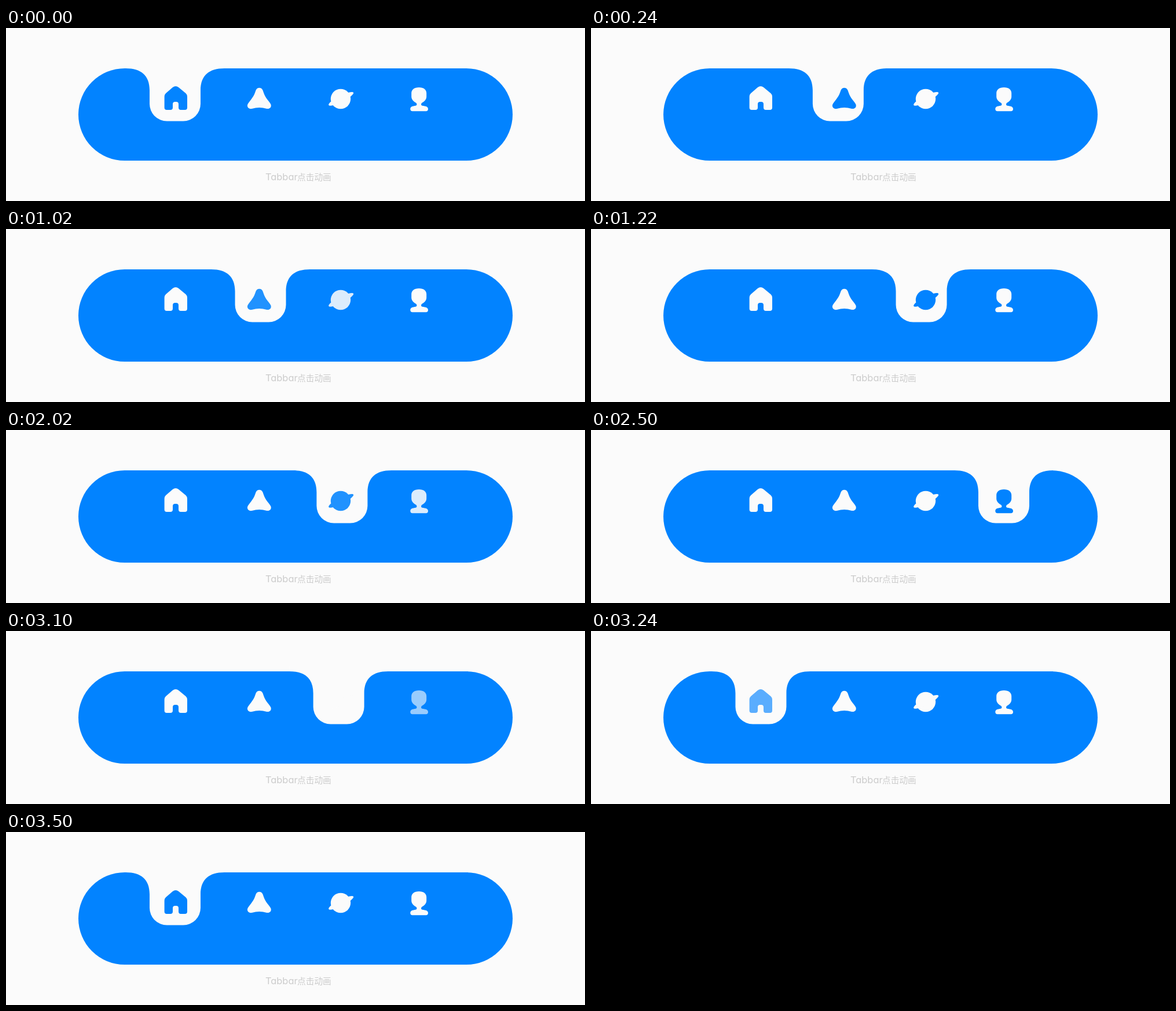
Recreate the animation shown at these times as an HTML page. Size 1000x300 px, loop 4000 ms.

```html
<!DOCTYPE html>
<html lang="zh">
<head>
<meta charset="utf-8">
<title>Tabbar</title>
<style>
  html, body { margin: 0; width: 100%; height: 100%; overflow: hidden; background: #fbfbfb; }
  svg { display: block; width: 100vw; height: 100vh; }
  text { fill: #ccc; }
  .latin { font: 400 16.4px Inter, sans-serif; font-feature-settings: "cv11"; }
  .han { font: 500 14.7px "Noto Sans CJK SC", "Noto Sans CJK", sans-serif; }
</style>
</head>
<body>
<svg viewBox="0 0 1000 300">
  <rect width="1000" height="300" fill="#fbfbfb"/>
  <rect x="125" y="70" width="750" height="160" rx="80" fill="#0283ff"/>
  <!-- notch, centred on x = 0 -->
  <path id="notch" fill="#fbfbfb" d="M-85,60 V70 C-59,70 -44,82 -44,108 V131.5 A30,30 0 0 0 -14,161.5
    H14 A30,30 0 0 0 44,131.5 V108 C44,82 59,70 85,70 V60 Z"/>
  <g class="icon">
    <path d="M287.8,103 Q293,99 298.2,103 L310.5,113.2 Q313,115.4 313,119 V138 Q313,142 309,142 H302
      Q298,142 298,138 V132 Q298,128 294,128 H292 Q288,128 288,132 V138 Q288,142 284,142 H277.6
      Q273.6,142 273.6,138 V119 Q273.6,115.4 276,113.2 Z"/>
  </g>
  <g class="icon">
    <path d="M431.5,108 C433.5,102.2 441.5,102.2 443.5,108 C445,112.5 447,118 449.5,121.5
      C451.8,124.7 455,128.2 456.9,131.5 C459.5,136.2 456.2,140.9 450.5,140 C441,137.2 434,137.2 424.5,140
      C418.5,141 415.2,136 417.8,131.5 C419.8,128.2 423,124.7 425,121.5 C428,118 430,112.5 431.5,108 Z"/>
  </g>
  <g class="icon">
    <circle cx="578" cy="123" r="17.2"/>
    <ellipse cx="578.7" cy="122.8" rx="24" ry="5.4" transform="rotate(-27 578.7 122.8)"/>
  </g>
  <g class="icon">
    <path d="M713.2,103 C721.5,103 726.2,107 726.2,113 V119 C726.2,124 722.5,127.5 718,130
      Q717,131 717,132.5 Q717,134.5 719,134.8 C725,135.5 729,136.5 729,140.5 Q729,144.2 725.3,144.2 H702
      Q698.3,144.2 698.3,140.5 C698.3,136.5 702,135.5 707.5,134.8 Q709.5,134.5 709.5,132.5
      Q709.5,131 708.5,130 C704,127.5 700.2,124 700.2,119 V113 C700.2,107 705,103 713.2,103 Z"/>
  </g>
  <text class="latin" x="448" y="264">Tabbar</text>
  <text class="han" x="503" y="263.5">点击动画</text>
</svg>
<script>
  const LOOP = 4000, STEP = 1000;
  const BLUE = [2, 131, 255], WHITE = [251, 251, 251];
  const stops = [292, 437, 578, 713];
  // peak: overshoot position, reached at `rise` ms, settled at `end` ms
  const moves = [
    { peak: 442, rise: 300, end: 467, fadeOut: 233, delay: 0 },
    { peak: 582, rise: 267, end: 500, fadeOut: 167, delay: 0 },
    { peak: 716, rise: 267, end: 500, fadeOut: 167, delay: 0 },
    { peak: 282, rise: 267, end: 500, fadeOut: 167, delay: 133 }
  ];
  const FADE_IN = 167;

  const notch = document.getElementById('notch');
  const icons = document.querySelectorAll('.icon');

  const clamp = v => Math.min(1, Math.max(0, v));
  const mix = (a, b, k) => a + (b - a) * k;
  const ease = v => { const s = clamp(v); return s * s * (3 - 2 * s); };
  const tint = k => `rgb(${WHITE.map((c, i) => Math.round(mix(c, BLUE[i], k)))})`;

  function draw(time) {
    const t = time % LOOP;
    const from = Math.floor(t / STEP), to = (from + 1) % 4;
    const m = moves[from], p = t - from * STEP;

    const x = p < m.rise
      ? mix(stops[from], m.peak, ease(p / m.rise))
      : mix(m.peak, stops[to], ease((p - m.rise) / (m.end - m.rise)));
    notch.setAttribute('transform', `translate(${x.toFixed(2)} 0)`);

    icons.forEach((icon, i) => {
      let k = 0;
      if (i === from) k = 1 - clamp(p / m.fadeOut);
      if (i === to) k = clamp((p - m.delay) / FADE_IN);
      icon.setAttribute('fill', tint(k));
    });
  }

  function tick() {
    draw(performance.now());
    requestAnimationFrame(tick);
  }
  tick();
</script>
</body>
</html>
```
